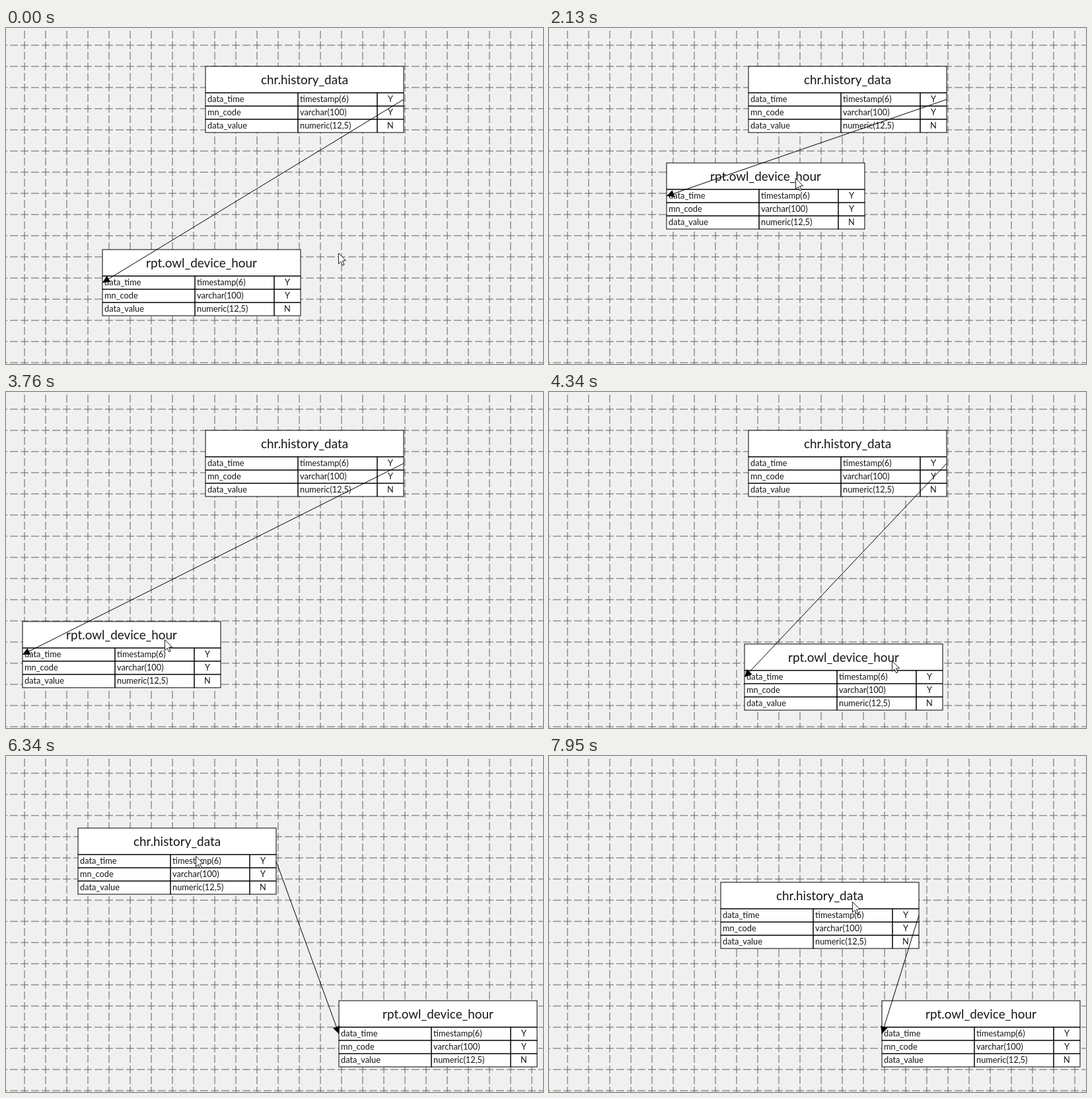
Recreate the animation shown at these times as an HTML page with a canvas. Size 813 px wide and 508 px high, loop 8000 ms.

```html
<!DOCTYPE html>
<html>
<head>
<meta charset="utf-8">
<style>
html, body { margin: 0; width: 100%; height: 100%; overflow: hidden; background: #f0f0f0; }
canvas { display: block; }
</style>
</head>
<body>
<canvas id="stage" width="813" height="508"></canvas>
<script>
const W = 813, H = 508, LOOP = 8000, CELL = 32;
const ctx = document.getElementById('stage').getContext('2d');

// turning points of each drag: [step, x, y]
const SOURCE_PATH = [[41, 302, 58], [48, 30, 157], [52, 32, 369], [58, 260, 191], [60, 320, 140]];
const TARGET_PATH = [[2, 146, 335], [4, 225, 366], [8, 478, 323], [15, 178, 204], [20, -32, 246],
  [27, 25, 347], [32, 358, 385], [36, 483, 375], [37, 504, 370]];

const COLUMNS = [140, 120, 40];
const ROWS = [['data_time', 'timestamp(6)', 'Y'], ['mn_code', 'varchar(100)', 'Y'], ['data_value', 'numeric(12,5)', 'N']];

const clamp = v => Math.min(1, Math.max(0, v));
const mix = (a, b, u) => a.map((v, i) => v + (b[i] - v) * u);
const add = (a, b) => a.map((v, i) => v + b[i]);

// The picture is held for about 140 ms, slightly less as the loop goes on:
// step k starts at 142.3 k - 0.0958 k^2 - 12 ms.
function stepAt(ms) {
  const b = 142.3, c = 0.0958;
  return Math.min(58, Math.floor((b - Math.sqrt(b * b - 4 * c * (ms + 12))) / (2 * c)));
}

// cubic Hermite curve through unevenly timed points, at rest at both ends
function curve(keys, t) {
  let i = 0;
  while (i < keys.length - 2 && t >= keys[i + 1][0]) i++;
  const p = keys[i], q = keys[i + 1], h = q[0] - p[0];
  const u = clamp((t - p[0]) / h), v = 1 - u;
  const slope = (n, c) => {
    const a = keys[n - 1], b = keys[n + 1];
    return a && b ? (b[c] - a[c]) / (b[0] - a[0]) : 0;
  };
  return [1, 2].map(c => Math.round(
    v * v * (1 + 2 * u) * p[c] + u * u * (3 - 2 * u) * q[c] +
    h * u * v * (v * slope(i, c) - u * slope(i + 1, c))));
}

// The pointer runs a little ahead of the table it drags.
function pointerAt(k) {
  const onTarget = add(curve(TARGET_PATH, k + 0.25), [206, 24]);
  const onSource = add(curve(SOURCE_PATH, k + 0.25), [190, 37]);
  const held = mix([503, 340], onTarget, clamp(k / 2));
  return mix(held, onSource, clamp((k - 37) / 4));
}

function line(x1, y1, x2, y2) {
  ctx.beginPath();
  ctx.moveTo(x1, y1);
  ctx.lineTo(x2, y2);
  ctx.stroke();
}

function shape(points) {
  ctx.beginPath();
  points.forEach(([x, y]) => ctx.lineTo(x, y));
  ctx.closePath();
}

function drawGrid() {
  ctx.fillStyle = '#f0f0f0';
  ctx.fillRect(0, 0, W, H);
  ctx.strokeStyle = '#606060';
  ctx.lineWidth = 1;
  ctx.setLineDash([12, 4]);
  ctx.lineDashOffset = 12;
  for (let x = 28; x < W; x += CELL) line(x, 0, x, H);
  ctx.lineDashOffset = 10;
  for (let y = 26; y < H; y += CELL) line(0, y, W, y);
  ctx.setLineDash([]);
}

// Cells share edges on whole pixels, so inner lines come out darker.
function drawCell(text, x, y, w, h, centered) {
  ctx.strokeRect(x, y, w, h);
  ctx.textAlign = centered ? 'center' : 'left';
  ctx.fillText(text, centered ? x + w / 2 : x + 3, y + h / 2 + (h > 20 ? 7 : 4));
}

function drawTable(title, [x, y]) {
  ctx.fillStyle = '#fff';
  ctx.fillRect(x, y, 300, 100);
  ctx.fillStyle = '#161616';
  ctx.strokeStyle = '#000';
  ctx.lineWidth = 1;
  ctx.font = '18.9px Lato, sans-serif';
  drawCell(title, x, y, 300, 40, true);
  ctx.font = '12.8px Lato, sans-serif';
  ROWS.forEach((row, r) => {
    let left = x;
    row.forEach((text, c) => {
      drawCell(text, left, y + 40 + r * 20, COLUMNS[c], 20, c === 2);
      left += COLUMNS[c];
    });
  });
}

function drawLink(source, target) {
  const [x1, y1] = add(source, [300, 50]), [x2, y2] = add(target, [0, 50]);
  ctx.strokeStyle = ctx.fillStyle = '#000';
  ctx.lineWidth = 1;
  line(x1, y1, x2, y2);
  ctx.save();
  ctx.translate(x2, y2);
  ctx.rotate(Math.atan2(y2 - y1, x2 - x1));
  shape([[0, 0], [-11, -5.5], [-11, 5.5]]);
  ctx.fill();
  ctx.restore();
}

function drawPointer([x, y]) {
  ctx.save();
  ctx.translate(Math.round(x) + 0.5, Math.round(y) + 0.5);
  shape([[0, 0], [0, 16], [3.6, 12.6], [6.2, 18.4], [8.6, 17.4], [6, 11.6], [11, 11.2]]);
  ctx.fillStyle = '#fff';
  ctx.fill();
  ctx.strokeStyle = '#1c1c2c';
  ctx.lineWidth = 1;
  ctx.stroke();
  ctx.restore();
}

function draw(ms) {
  const k = stepAt(ms);
  const source = curve(SOURCE_PATH, k), target = curve(TARGET_PATH, k);
  drawGrid();
  drawTable('chr.history_data', source);
  drawTable('rpt.owl_device_hour', target);
  drawLink(source, target);
  drawPointer(pointerAt(k));
}

const start = performance.now();
function tick(now) {
  draw(Math.max(0, now - start) % LOOP);
  requestAnimationFrame(tick);
}
requestAnimationFrame(tick);
</script>
</body>
</html>
```
